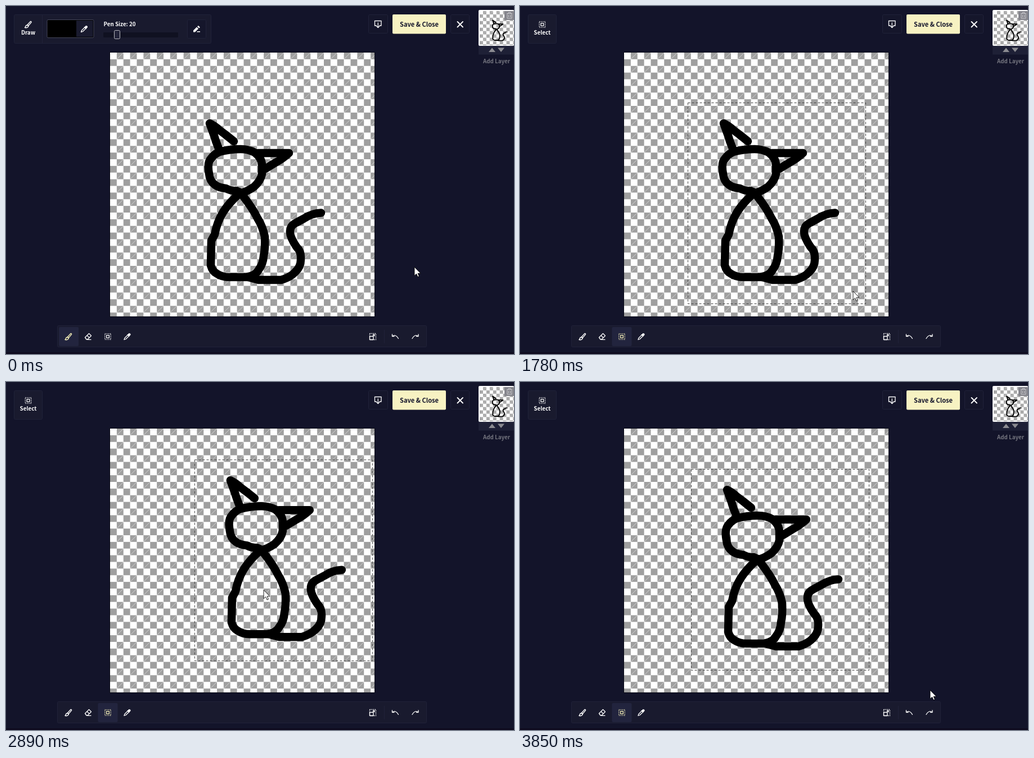
Recreate the animation shown at these times as an HTML page. Size 903x620 px, loop 3.87 s.

```html
<!DOCTYPE html>
<html lang="en">
<head>
<meta charset="utf-8">
<title>Moving a selection</title>
<style>
  html, body { margin: 0; width: 100%; height: 100%; overflow: hidden; background: #13142a; }
  svg { display: block; }
  text { font: bold 9.8px "Noto Sans CJK JP", "Noto Sans CJK", "Noto Sans", sans-serif; text-anchor: middle; fill: #fff; }
  .panel { fill: #191a2e; stroke: #202239; }
  .button { fill: #15162b; stroke: #202239; }
  .icon { fill: none; stroke: currentColor; stroke-width: 1.3; stroke-linejoin: round; stroke-linecap: round; }
  .solid { fill: currentColor; stroke: none; }
  .active { color: #f5f0b8; }
</style>
</head>
<body>
<svg width="903" height="620" viewBox="0 0 903 620" color="#fff">
  <defs>
    <pattern id="checker" width="23.75" height="23.75" patternUnits="userSpaceOnUse">
      <rect width="24" height="24" fill="#fff"/>
      <path d="M11.875 0h11.875v11.875h-11.875zM0 11.875h11.875v11.875H0z" fill="#9f9f9f"/>
      <path d="M11.875 11.875L23.75 0" stroke="#dcdcdc" stroke-width=".9"/>
    </pattern>
    <clipPath id="page"><rect x="185" y="83" width="470" height="470"/></clipPath>

    <g id="cat" fill="none" stroke="#000" stroke-width="14.5" stroke-linecap="round" stroke-linejoin="round">
      <path d="M379 256Q373 242 370 231L362 209Q372 214 378 220L390 229L405 241"/>
      <path d="M379 260Q397 255 417 255Q431 255 442 261Q455 271 455 284V299Q453 311 441 322Q428 331 418 333L409 329Q400 330 391 325Q379 324 372 319Q362 312 361 299Q357 279 365 271Q370 264 379 260"/>
      <path d="M448 262H503Q491 273 479 279L461 290"/>
      <path d="M414 335Q397 350 386 367Q375 385 371 407L365 418L364 462Q367 473 375 477Q384 483 396 483H428Q444 480 449 470Q457 460 458 445Q461 432 460 411Q456 392 447 378Q439 361 421 338"/>
      <path d="M430 483L449 488H489Q506 483 514 474Q524 465 524 452Q525 437 517 430Q504 411 505 401Q505 391 516 386L529 379Q544 369 560 368.5"/>
    </g>

    <g id="brush" class="icon">
      <path d="M-1.5 .5L4 -5.5Q6 -6 5.5 -4L.5 2Z"/>
      <path d="M-2 1Q-4.5 1.5 -4.5 3.5L-6 5.5Q-1 6.5 .5 3Z"/>
    </g>
    <path id="eraser" class="icon" d="M-5.5 1.5L1.5 -5.5L5.5 -1.5L-1 5H-3ZM-2 -2L2 2M-2 5.3H5"/>
    <g id="marquee" class="icon">
      <rect x="-5.2" y="-5.2" width="10.4" height="10.4" stroke-dasharray="1.5 1.47" stroke-linecap="butt"/>
      <rect x="-2.3" y="-2.3" width="4.6" height="4.6"/>
    </g>
    <g id="dropper" class="icon">
      <path d="M-5.5 5.5L-4.5 2.5L1 -3L3 -1L-2.5 4.5Z"/>
      <path d="M-.5 -3.5L1 -4L3 -6Q6.5 -6 6 -3L4 -1L3.5 .5Z" class="solid"/>
    </g>
    <g id="resize" class="icon">
      <rect x="-5.5" y="-5.5" width="11" height="11" stroke-dasharray="1.5 1.5" stroke-linecap="butt"/>
      <path d="M-5.5 -.5H1V5.5H-5.5ZM0 -1L3 -3.5M.5 -3.5H3V-1"/>
    </g>
    <path id="undo" class="icon" d="M-5.5 -.5Q1 -5 5.5 3.5M-5.5 -4V-.5H-2"/>
    <path id="pen" class="solid" d="M-6 5.5V2.5L0 -3.5L3 -.5L-3 5.5ZM1 -4.5L3 -6L6 -3L4 -1.5ZM1 4H6V5.5H0Z"/>

    <path id="arrow" d="M0 0V15.5L3.6 12.2L6 17.6L8.4 16.5L6.1 11.3H11Z" fill="#fff" stroke="#000" stroke-width=".9"/>
    <path id="hand" d="M-1.5 1.5Q-1.5 0 0 0Q1.5 0 1.5 1.5V6Q3 4.8 4 6.3Q5.4 5.5 6.3 7Q8.8 6.5 9 9V12Q8.5 15 7 18.5H-.5Q-2 15 -5 11.5Q-6.5 9.5 -4.5 9L-1.5 11Z" fill="#fff" stroke="#000" stroke-width=".9"/>
  </defs>

  <rect width="903" height="620" fill="#13142a"/>
  <rect y="617" width="903" height="3" fill="#0e0b1f"/>

  <g id="drawPanel">
    <rect class="panel" x="14.5" y="15.5" width="350" height="51" rx="2"/>
    <path d="M64.5 16V66" stroke="#202239"/>
    <use href="#brush" x="39.5" y="33"/>
    <text x="39.5" y="51">Draw</text>
    <rect x="73" y="24.5" width="83" height="32" rx="2" stroke="#44465a"/>
    <rect x="125" y="26" width="29.5" height="29" fill="#191a2e"/>
    <use href="#dropper" x="139" y="41"/>
    <text x="202" y="36">Pen Size: 20</text>
    <rect x="173" y="47" width="133" height="9" rx="1" fill="#101121"/>
    <rect x="192.5" y="43.5" width="10" height="15" rx="2" fill="#23243a" stroke="#b9b9c0"/>
    <rect class="button" x="322.5" y="24.5" width="33" height="33" rx="2"/>
    <use href="#pen" x="339" y="41"/>
  </g>
  <g id="selectPanel">
    <rect class="panel" x="14.5" y="15.5" width="50" height="51" rx="2"/>
    <use href="#marquee" x="39.5" y="33"/>
    <text x="39.5" y="51">Select</text>
  </g>

  <rect class="button" x="644.5" y="15.5" width="34" height="33" rx="2"/>
  <path class="icon" d="M658.5 35H655.5V26.5H667V35H664M661.3 30V38M658.8 36L661.3 38.5L663.8 36"/>
  <rect x="687" y="15" width="95" height="34.5" rx="2" fill="#f7f2c2"/>
  <text x="734.5" y="37" style="font-size:11.1px;fill:#13142a">Save &amp; Close</text>
  <rect class="button" x="790.5" y="15.5" width="33" height="33" rx="2"/>
  <path class="icon" d="M802.5 28L812 37.5M812 28L802.5 37.5" style="stroke-width:1.9"/>

  <rect x="840" y="71" width="63" height="15.5" fill="#1e2036"/>
  <rect x="840" y="7" width="63" height="64" rx="2" fill="#fff"/>
  <g transform="translate(842 9)">
    <rect width="122" height="122" fill="url(#checker)" transform="scale(.5)" opacity=".9"/>
    <use href="#cat" transform="scale(.13) translate(-185 -83)"/>
  </g>
  <rect x="886" y="9" width="17" height="16" fill="#85858c"/>
  <path d="M890 13.5H900M893 13V11.5H897V13M891 14.5V22H899V14.5M893.5 16V20M896.5 16V20" fill="none" stroke="#c8c8cc"/>
  <path d="M858 82L864 74.5L870 82ZM874 74.5H886L880 82Z" fill="#8b8b91"/>
  <text x="872" y="102" style="fill:#74757f">Add Layer</text>

  <rect x="184" y="82" width="472" height="472" fill="#0b0c18"/>
  <rect width="470" height="470" fill="url(#checker)" transform="translate(185 83)"/>
  <g clip-path="url(#page)">
    <use href="#cat" id="drawing"/>
    <rect id="selection" fill="none" stroke="#454545" stroke-dasharray="4 3"/>
  </g>

  <rect class="panel" x="91.5" y="569.5" width="656" height="38" rx="2"/>
  <rect id="highlight" y="572" width="35" height="34" rx="2" fill="#22243e"/>
  <use href="#brush" x="111" y="589" id="brushTool"/>
  <use href="#eraser" x="146" y="589"/>
  <use href="#marquee" x="181" y="589" id="selectTool"/>
  <use href="#dropper" x="215.5" y="589"/>
  <use href="#resize" x="652" y="589"/>
  <path d="M672.5 577V601" stroke="#202239"/>
  <use href="#undo" x="692" y="589"/>
  <use href="#undo" transform="translate(727.5 589) scale(-1 1)"/>

  <use id="cursor"/>
</svg>
<script>
const LOOP = 3870, TOOL_CHANGE = 380;
const SELECT = [1240, 1620], DRAG = [1980, 3620], POINTER_LEAD = 12;
const topLeft = { x: 298, y: 172 }, bottomRight = { x: 614, y: 530 };
const button = { x: 177, y: 594 }, grab = { x: 447, y: 397 };

// Turning points of the sideways shake: time and horizontal offset.
const swings = [
  [1980, 0], [2080, 11], [2320, -100], [2510, 118], [2675, -98], [2840, 95],
  [2985, -116], [3150, 92], [3400, -118], [3510, 63], [3620, 6]
];

const mix = (a, b, u) => a + (b - a) * u;
const ease = (t, from, to) => {
  const u = Math.min(1, Math.max(0, (t - from) / (to - from)));
  return (1 - Math.cos(Math.PI * u)) / 2;
};
const travel = (t, [from, to], a, b) => {
  const u = ease(t, from, to);
  return { x: mix(a.x, b.x, u), y: mix(a.y, b.y, u) };
};

// The drawing is shaken along a slanted line that it reaches after the grab.
function dragOffset(t) {
  const x = swings.reduce((value, [end, target], i) =>
    i ? mix(value, target, ease(t, swings[i - 1][0], end)) : target, 0);
  const lift = 23.3 * ease(t, DRAG[0], DRAG[0] + 100) - 8 * ease(t, DRAG[1] - 110, DRAG[1]);
  return { x, y: -lift - 0.285 * x };
}

function pointer(t) {
  if (t < 690) return travel(t, [0, 200], { x: 726, y: 465 }, button);
  if (t < SELECT[0]) {
    const onIcon = travel(t, [690, 710], button, { x: 181, y: 583 });
    return travel(t, [710, 1130], onIcon, topLeft);
  }
  if (t < 1760) return travel(t, SELECT, topLeft, bottomRight);
  if (t < DRAG[0]) {
    const inside = travel(t, [1760, 1780], bottomRight, { x: 592, y: 508 });
    return travel(t, [1780, DRAG[0]], inside, grab);
  }
  const { x, y } = dragOffset(t + POINTER_LEAD);
  return travel(t, [DRAG[1], 3850], { x: grab.x + x, y: grab.y + y }, { x: 729, y: 549 });
}

const $ = id => document.getElementById(id);
const set = (id, attrs) => {
  for (const name in attrs) $(id).setAttribute(name, attrs[name]);
};
const show = (id, on) => set(id, { visibility: on ? "visible" : "hidden" });

function render(t) {
  const selecting = t >= TOOL_CHANGE;
  show("drawPanel", !selecting);
  show("selectPanel", selecting);
  set("highlight", { x: selecting ? 163.5 : 94 });
  $("brushTool").classList.toggle("active", !selecting);
  $("selectTool").classList.toggle("active", selecting);

  const { x, y } = pointer(t);
  const overTool = x > 94 && x < 233 && y > 572 && y < 606;
  set("cursor", { href: overTool ? "#hand" : "#arrow", x, y });

  const offset = dragOffset(t);
  const corner = travel(t, SELECT, topLeft, bottomRight);
  set("drawing", offset);
  set("selection", {
    x: topLeft.x + 0.5 + offset.x,
    y: topLeft.y + 0.5 + offset.y,
    width: corner.x - topLeft.x,
    height: corner.y - topLeft.y
  });
  show("selection", t > SELECT[0]);
}

const start = performance.now();
function tick() {
  render((performance.now() - start) % LOOP);
  requestAnimationFrame(tick);
}
tick();
</script>
</body>
</html>
```
